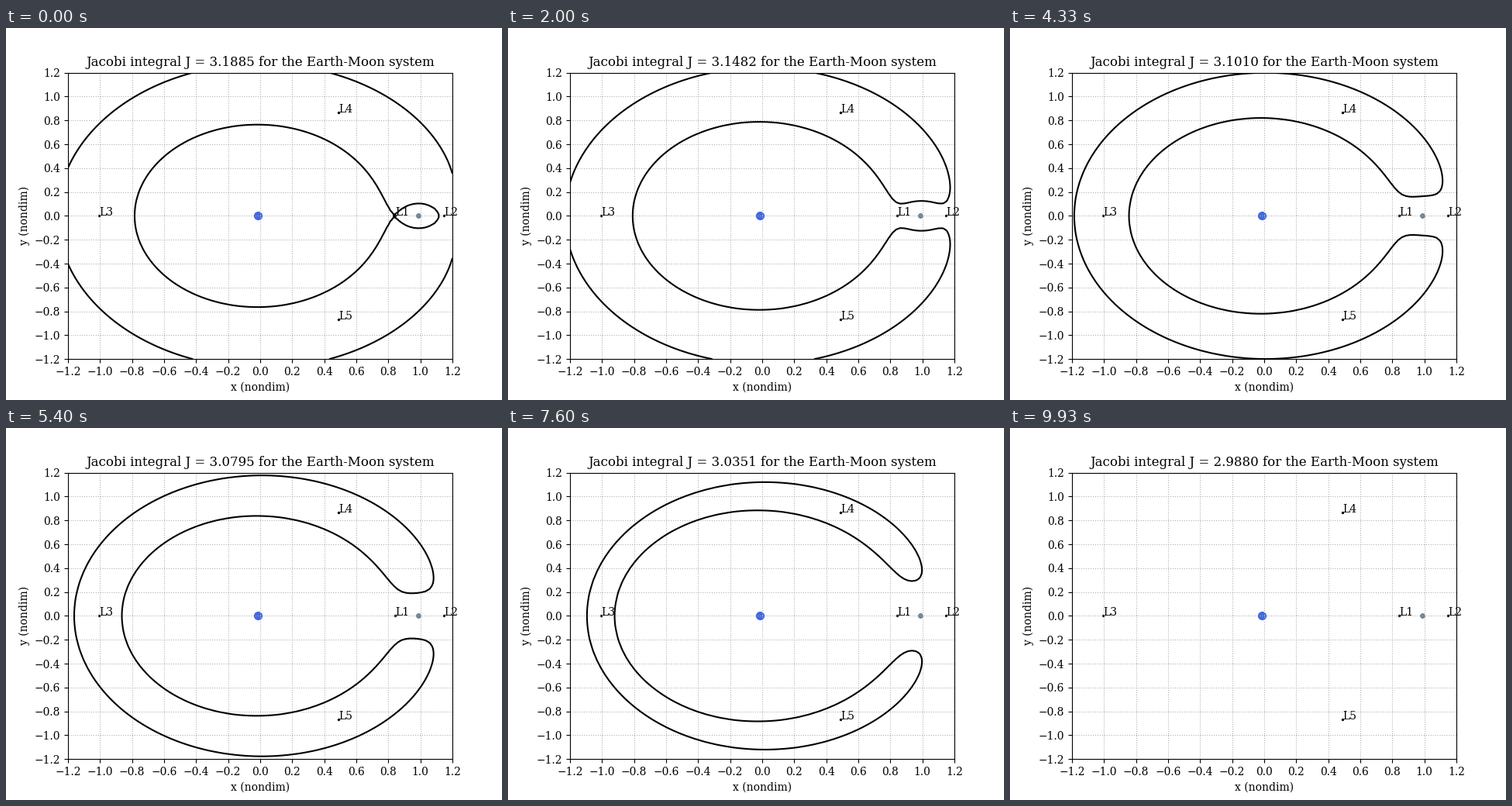
A matplotlib script that plays this animation: 640 by 480 pixels, repeating every 9.99 s.

```python
import numpy as np
import matplotlib.pyplot as plt
from matplotlib.animation import FuncAnimation
from matplotlib.ticker import MultipleLocator

plt.rcParams["font.family"] = "DejaVu Serif"

MU = 0.01215          # Moon's share of the total mass
LIM = 1.2
FRAMES = 150
INTERVAL = 66.6       # ms

J_START = 3.188528            # necks just closed at L1
J_END = 3 - MU * (1 - MU)     # forbidden region vanishes at L4 and L5


def jacobi(x, y):
    """Jacobi integral of a body at rest in the rotating frame."""
    r1 = np.hypot(x + MU, y)
    r2 = np.hypot(x - 1 + MU, y)
    return x**2 + y**2 + 2 * (1 - MU) / r1 + 2 * MU / r2


axis = np.linspace(-LIM, LIM, 100)
X, Y = np.meshgrid(axis, axis)
Z = jacobi(X, Y)
levels = np.linspace(J_START, J_END, FRAMES)

fig, ax = plt.subplots(figsize=(6.4, 4.8), dpi=100)
ax.set_xlim(-LIM, LIM)
ax.set_ylim(-LIM, LIM)
ax.set_xlabel("x (nondim)")
ax.set_ylabel("y (nondim)")
ax.xaxis.set_major_locator(MultipleLocator(0.2))
ax.yaxis.set_major_locator(MultipleLocator(0.2))
ax.grid(linestyle=":")
title = ax.set_title("")

ax.scatter(-MU, 0, s=50, color="royalblue")
ax.scatter(1 - MU, 0, s=15, color="slategray")

h = np.sqrt(3) / 2
points = {
    "L1": (0.841, 0),
    "L2": (1.1472, 0),
    "L3": (-1 - 5 * MU / 12, 0),
    "L4": (0.5 - MU, h),
    "L5": (0.5 - MU, -h),
}
for name, (px, py) in points.items():
    ax.scatter(px, py, s=2, color="black")
    ax.text(px, py, name)

curves = []


def update(i):
    while curves:
        curves.pop().remove()
    level = levels[i]
    if level > Z.min():
        curves.append(ax.contour(X, Y, Z, levels=[level], colors="black"))
    title.set_text(f"Jacobi integral J = {level:.4f} for the Earth-Moon system")


anim = FuncAnimation(fig, update, frames=FRAMES, interval=INTERVAL,
                     init_func=lambda: update(0), repeat=True, repeat_delay=0)
plt.show()
```
